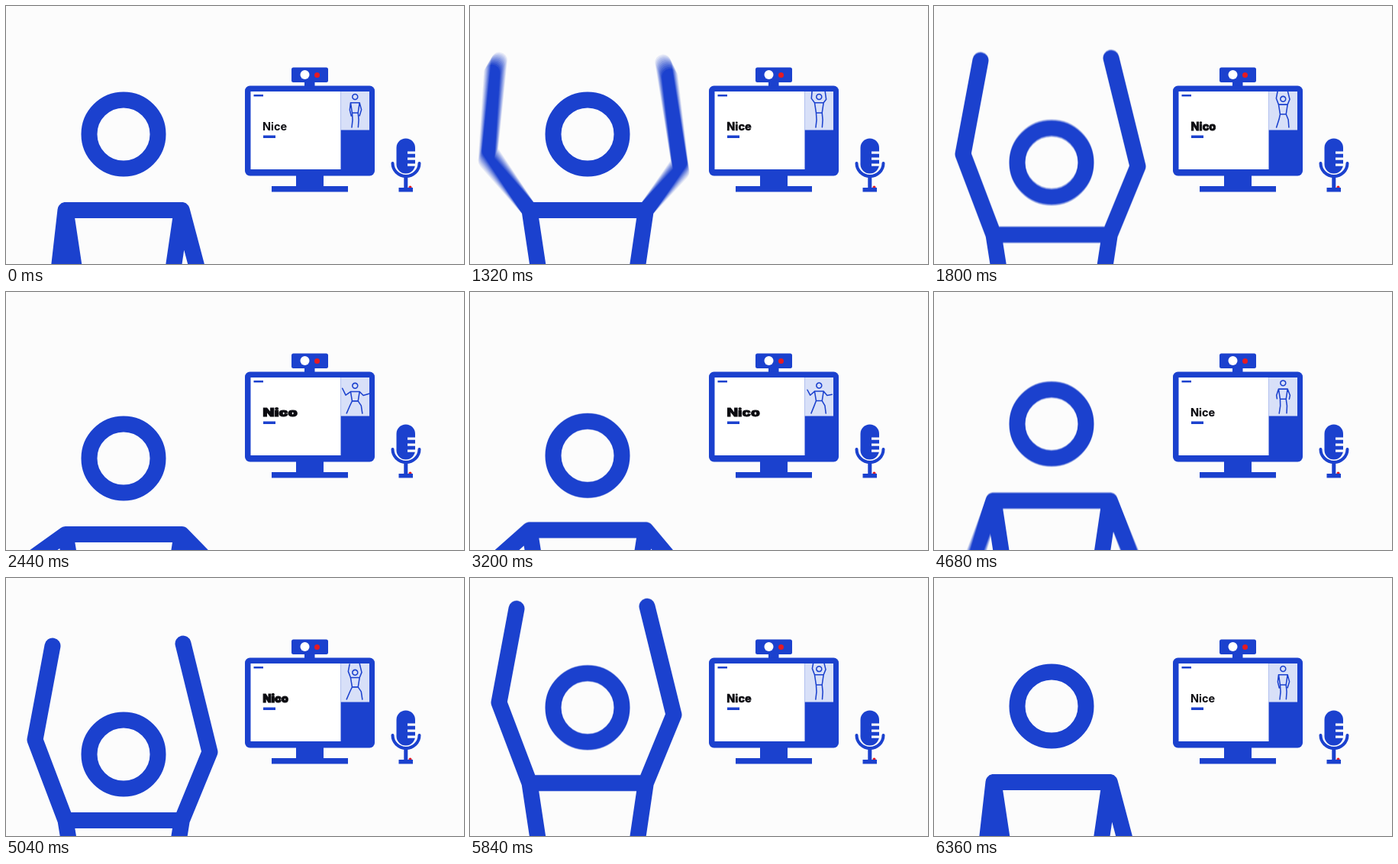
Animation, 600 px wide and 338 px high, one loop 7240 ms. Source, as an HTML page with a canvas:

```html
<!DOCTYPE html>
<html lang="en">
<head>
<meta charset="utf-8">
<title>Body type</title>
<style>
  html, body { margin: 0; width: 100%; height: 100%; overflow: hidden; background: #fcfcfc; }
  canvas, svg { position: absolute; left: 0; top: 0; width: 600px; height: 338px; }
  .ink { fill: #1b41ce; }
  .line { fill: none; stroke: #1b41ce; stroke-linecap: round; stroke-linejoin: round; }
  text { font-family: Inter, Arial, sans-serif; font-size: 14.5px; fill: #0b0b10; stroke: #0b0b10; }
</style>
</head>
<body>
<canvas id="stage" width="600" height="338"></canvas>
<svg viewBox="0 0 600 338">
  <defs><clipPath id="pane"><rect x="438.5" y="112" width="37.5" height="50.5"/></clipPath></defs>

  <g class="ink">
    <rect x="374" y="80.5" width="48" height="19.5" rx="2.5"/>
    <rect x="391" y="99" width="13.5" height="7"/>
    <rect x="313" y="104.5" width="170" height="118" rx="6.5"/>
    <rect x="380" y="222" width="36" height="15"/>
    <rect x="348" y="236" width="100" height="7.5"/>
  </g>
  <circle cx="391.5" cy="90" r="6" fill="#fff"/>
  <circle cx="407.5" cy="90.5" r="3.5" fill="#e51b23"/>
  <rect x="320.5" y="112" width="118" height="102" fill="#fff"/>
  <rect x="438.5" y="112" width="37.5" height="50.5" fill="#d8e0f8"/>
  <rect class="ink" x="324.5" y="116" width="12.5" height="2.5"/>
  <rect class="ink" x="337" y="169.5" width="16" height="3.5"/>
  <g id="word"><text id="label">Nice</text></g>

  <g clip-path="url(#pane)">
    <path id="mini" class="line" stroke-width="20"
      transform="translate(457.3 119) scale(.077) translate(-154 -168)"/>
  </g>

  <rect class="ink" x="511.5" y="173.5" width="24.5" height="46" rx="12.2"/>
  <g fill="#fcfcfc">
    <rect x="526" y="190.5" width="11" height="3.2"/>
    <rect x="526" y="198.5" width="11" height="3.2"/>
    <rect x="526" y="206.5" width="11" height="3.2"/>
  </g>
  <path class="line" stroke-width="4" d="M506.5 206a17.5 17 0 0 0 35 0"/>
  <circle cx="529.5" cy="237.5" r="2" fill="#e51b23"/>
  <g class="ink">
    <rect x="521.3" y="224" width="5" height="15"/>
    <rect x="514.5" y="238" width="18.5" height="5.5"/>
  </g>
</svg>

<script>
const LOOP = 7240, STEP = 40, SHUTTER = 20, SAMPLES = 10;
const BLUE = '#1b41ce', PAPER = '#fcfcfc';

// Limbs list x, y pairs: left elbow/knee, left hand/foot, then right.
// Arms are relative to the body drop, legs are fixed to the floor.
const standing = [112, 560, 98, 688, 216, 560, 207, 684];
const squatting = [70, 548, 10, 686, 258, 556, 278, 688];
const raised = [38, 162, 61, 39, 267, 178, 232, 36];
const swing = [-41, 334, -90, 230, 313, 345, 370, 266];

const rest = { drop: 0, head: 0, hip: 440, bold: 0, wide: 1, legs: standing,
  arms: [64, 390, 89, 492, 262, 387, 230, 490] };
const up = { drop: 0, head: 0, hip: 440, bold: .35, wide: 1, legs: standing, arms: raised };
const crouch = { drop: 50, head: 63, hip: 478, bold: 1, wide: 1, legs: squatting, arms: raised };
const side = { drop: 50, head: 50, hip: 478, bold: .85, wide: 1.36, legs: squatting,
  arms: [-5, 327, -62, 212, 294, 333, 392, 302] };

const cubic = u => u < .5 ? 4 * u ** 3 : 1 - 4 * (1 - u) ** 3;
const sink = u => u ** 1.12;

const moves = [
  { start: 960, end: 1470, from: rest, to: up, ease: cubic, arc: true },
  { start: 1470, end: 1960, from: up, to: crouch, ease: sink },
  { start: 1960, end: 2440, from: crouch, to: side, ease: cubic },
  { start: 2920, end: 3840, from: side, to: rest, ease: cubic },
  { start: 4520, end: 5040, from: rest, to: crouch, ease: cubic, arc: true },
  { start: 5520, end: 5910, from: crouch, to: up, ease: cubic },
  { start: 5910, end: 6360, from: up, to: rest, ease: cubic, arc: true }
];

const mix = (a, b, p) => a + (b - a) * p;
const mixAll = (a, b, p) => a.map((v, i) => mix(v, b[i], p));

function poseAt(t) {
  const m = moves.findLast(m => m.start <= t);
  if (!m) return rest;
  const { from, to } = m;
  const p = m.ease(Math.min(1, (t - m.start) / (m.end - m.start)));
  const pose = {};
  for (const key of ['drop', 'hip', 'bold', 'wide']) pose[key] = mix(from[key], to[key], p);
  pose.head = mix(from.head, to.head, p ** 1.2);
  pose.legs = mixAll(from.legs, to.legs, p);
  pose.arms = m.arc
    ? mixAll(mixAll(from.arms, swing, p), mixAll(swing, to.arms, p), p)
    : mixAll(from.arms, to.arms, p);
  return pose;
}

function figure({ drop, head, hip, arms, legs }) {
  const joint = (list, i, dy = 0) => `${list[i]} ${list[i + 1] + dy}`;
  const arm = i => joint(arms, i, drop);
  const y = 267.5 + drop;
  const ls = `78 ${y}`, rs = `230.3 ${y}`, lh = `104 ${hip}`, rh = `205 ${hip}`;
  return `M109 ${168 + head}a45 45 0 1 0 90 0a45 45 0 1 0 -90 0Z` +
    `M${arm(2)}L${arm(0)}L${ls}L${rs}L${arm(4)}L${arm(6)}` +
    `M${ls}L${lh}L${rh}L${rs}` +
    `M${lh}L${joint(legs, 0)}L${joint(legs, 2)}` +
    `M${rh}L${joint(legs, 4)}L${joint(legs, 6)}`;
}

const $ = id => document.getElementById(id);
const ctx = $('stage').getContext('2d');
const layer = document.createElement('canvas');
layer.width = 600;
layer.height = 338;
const pen = layer.getContext('2d');
pen.lineWidth = 21;
pen.lineCap = pen.lineJoin = 'round';
pen.strokeStyle = BLUE;
pen.fillStyle = PAPER;

// Averages several moments within the shutter for motion blur.
function drawBody(t) {
  for (let i = 0; i < SAMPLES; i++) {
    const at = t + SHUTTER * (i / (SAMPLES - 1) - .5);
    pen.fillRect(0, 0, 600, 338);
    pen.stroke(new Path2D(figure(poseAt(at))));
    ctx.globalAlpha = 1 / (i + 1);
    ctx.drawImage(layer, 0, 0);
  }
}

function drawScreen(pose) {
  const { bold, wide } = pose;
  $('mini').setAttribute('d', figure(pose));
  $('word').setAttribute('transform', `translate(${336 + bold * .6} 163) scale(${wide} 1)`);
  const label = $('label');
  label.textContent = bold > .5 ? 'Nico' : 'Nice';
  label.style.fontWeight = Math.round(700 + 200 * bold);
  label.style.strokeWidth = 1.1 * bold;
}

let shown = -1;
function tick() {
  const t = Math.floor(performance.now() % LOOP / STEP) * STEP;
  if (t !== shown) {
    shown = t;
    drawBody(t);
    drawScreen(poseAt(t));
  }
  requestAnimationFrame(tick);
}
tick();
</script>
</body>
</html>
```
